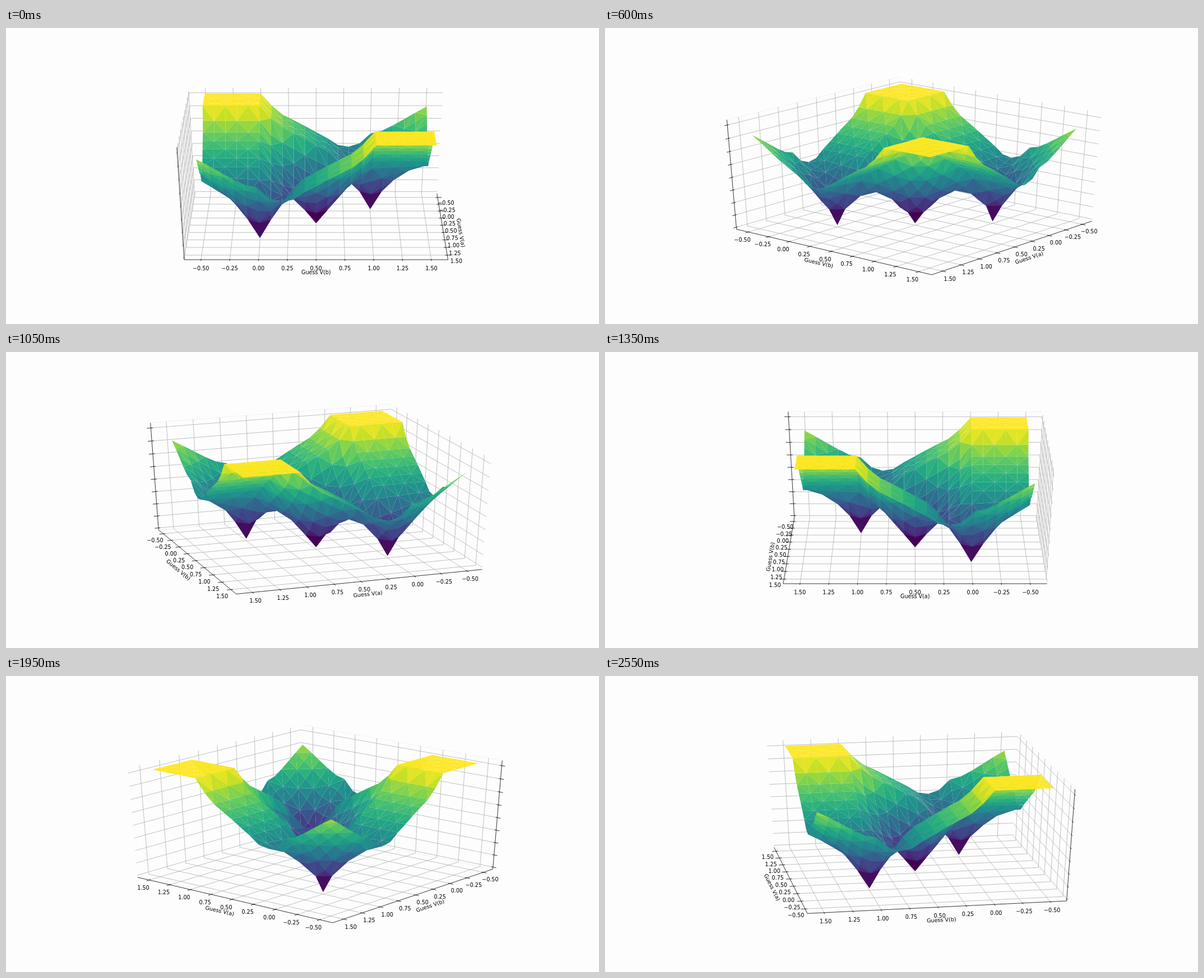
These frames come from a looping animation (1058 by 529 pixels, 2700 ms). An HTML page:

```html
<!DOCTYPE html>
<html lang="en">
<head>
<meta charset="utf-8">
<title>Rotating surface plot</title>
<style>
  html, body { margin: 0; width: 100%; height: 100%; overflow: hidden; background: #fdfdfd; }
  svg { display: block; width: 100%; height: 100%; }
  text { font: 9.6px "DejaVu Sans", sans-serif; text-anchor: middle; fill: #000; }
  .lines { fill: none; stroke-width: .8; }
</style>
</head>
<body>
<svg id="stage" viewBox="0 0 1058 529"></svg>
<script>
const STEP_MS = 150, STEPS = 18;
const HALF = 25 / 48;          // half size of the wall box, the data box being 1
const TICK = 1 / 12;
const LABEL_GAP = HALF + 0.037, TITLE_GAP = HALF + 0.0775;
const ELEV = Math.PI / 6;
const VIRIDIS = ['440154', '482475', '414487', '355f8d', '2a788e', '21918c',
  '22a884', '44bf70', '7ad151', 'bddf26', 'fde725']
  .map(hex => [0, 2, 4].map(i => parseInt(hex.substr(i, 2), 16)));

// Heights between the diagonals: row = 10b, entry = 10a - 10b
const ROWS = [
  [1, .884, .798, .745, .69, .631, .575, .48, .33, .175, 0],
  [.75, .68, .62, .56, .505, .45, .38, .3, .222],
  [.58, .51, .435, .378, .338, .334, .31],
  [.4, .31, .252, .262, .29],
  [.2, .128, .165],
  [0]
];
const RIM = { 7: .507, 8: .49, 9: .523 };   // heights at b = -0.5

const slope = n => 1.703 * n / (n + 8.73);

// i = 10a, j = 10b; the surface mirrors in both diagonals
function height(i, j) {
  if (j > i) [i, j] = [j, i];
  if (i + j > 10) [i, j] = [10 - j, 10 - i];
  if (i <= 0) return 1;
  if (j >= 0) return ROWS[j][i - j];
  if (i >= 10) return Math.hypot(slope(i - 10), slope(-j));
  const h = ROWS[0][i];
  return i < 7 ? h : h + (RIM[i] - h) * -j / 5;
}

const unit = v => (v - 0.5) / 2.2;
const vertex = (i, j) => [unit(i / 10), unit(j / 10), height(i, j) - 0.5];

function buildTriangles() {
  const list = [];
  for (let i = -5; i < 15; i++) {
    for (let j = -5; j < 15; j++) {
      const p = vertex(i, j), q = vertex(i + 1, j), r = vertex(i + 1, j + 1), s = vertex(i, j + 1);
      if ((i + j) & 1) list.push([p, q, r], [p, r, s]);
      else list.push([p, q, s], [q, r, s]);
    }
  }
  const mean = t => (t[0][2] + t[1][2] + t[2][2]) / 3;
  const means = list.map(mean);
  const lo = Math.min(...means), hi = Math.max(...means);
  return list.map((pts, n) => ({ pts, fill: viridis((means[n] - lo) / (hi - lo)) }));
}

function viridis(t) {
  const n = Math.min(9, Math.floor(t * 10)), k = t * 10 - n;
  return `rgb(${VIRIDIS[n].map((c, i) => Math.round(c + (VIRIDIS[n + 1][i] - c) * k))})`;
}

const stage = document.getElementById('stage');
function add(tag, attrs = {}, content = '') {
  const el = document.createElementNS('http://www.w3.org/2000/svg', tag);
  for (const key in attrs) el.setAttribute(key, attrs[key]);
  el.textContent = content;
  return stage.appendChild(el);
}

const ticks = Array.from({ length: 9 }, (_, n) => -0.5 + n * 0.25);
const zTicks = ticks.map((_, n) => -0.5 + n * 0.1217);
const format = v => (v < 0 ? '\u2212' : '') + Math.abs(v).toFixed(2);

const wallEdge = add('path', { class: 'lines', stroke: '#e6e6e6', 'stroke-dasharray': '3 2' });
const grid = add('path', { class: 'lines', stroke: '#b0b0b0' });
const axes = add('path', { class: 'lines', stroke: '#000' });
const aLabels = ticks.map(v => add('text', {}, format(v)));
const bLabels = ticks.map(v => add('text', {}, format(v)));
const aTitle = add('text', {}, 'Guess V(a)');
const bTitle = add('text', {}, 'Guess V(b)');
const triangles = buildTriangles();
const faces = triangles.map(() => add('path'));

function camera(azim) {
  const ca = Math.cos(azim), sa = Math.sin(azim), ce = Math.cos(ELEV), se = Math.sin(ELEV);
  return ([x, y, z]) => {
    const near = x * ca + y * sa, side = y * ca - x * sa;
    const depth = 10 - near * ce - z * se;
    return [553.3 + 4432 * side / depth, 257.5 - 2159 * (z * ce - near * se) / depth, depth];
  };
}

function draw(step) {
  const project = camera(step * Math.PI / 18);
  const line = (...pts) => 'M' + pts.map(p => {
    const [x, y] = project(p);
    return x.toFixed(2) + ' ' + y.toFixed(2);
  }).join('L');

  const nearX = step <= 9 ? 1 : -1;
  const nx = nearX * HALF, fx = -nx, ny = HALF, fy = -HALF, top = HALF, floor = -HALF;
  const out = TICK * 0.2, inn = TICK * 0.1;

  wallEdge.setAttribute('d', line([fx, fy, top], [nx, fy, top]) + line([fx, fy, floor], [nx, fy, floor]));

  let g = '';
  let k = line([-HALF, ny, floor], [HALF, ny, floor])
    + line([nx, -HALF, floor], [nx, HALF, floor])
    + line([nx, fy, floor], [nx, fy, top]);
  for (const v of ticks.map(unit)) {
    g += line([v, fy, top], [v, fy, floor], [v, ny, floor]);
    g += line([fx, v, top], [fx, v, floor], [nx, v, floor]);
    k += line([v, ny + out, floor], [v, ny - inn, floor]);
    k += line([nx + nearX * out, v, floor], [nx - nearX * inn, v, floor]);
  }
  for (const z of zTicks) {
    g += line([fx, ny, z], [fx, fy, z], [nx, fy, z]);
    k += line([nx + nearX * out, fy, z], [nx - nearX * inn, fy, z]);
  }
  grid.setAttribute('d', g);
  axes.setAttribute('d', k);

  const place = (el, p) => {
    const [x, y] = project(p);
    el.setAttribute('x', x);
    el.setAttribute('y', y + 7.2);
  };
  ticks.forEach((v, n) => {
    place(aLabels[n], [unit(v), LABEL_GAP, -LABEL_GAP]);
    place(bLabels[n], [nearX * LABEL_GAP, unit(v), -LABEL_GAP]);
  });

  const title = (el, p, from, to) => {
    const [x, y] = project(p), [x1, y1] = project(from), [x2, y2] = project(to);
    const angle = Math.atan((y2 - y1) / (x2 - x1)) * 180 / Math.PI;
    el.setAttribute('transform', `translate(${x} ${y}) rotate(${angle}) translate(0 2.5)`);
  };
  title(aTitle, [0, TITLE_GAP, -TITLE_GAP], [-HALF, ny, floor], [HALF, ny, floor]);
  title(bTitle, [nearX * TITLE_GAP, 0, -TITLE_GAP], [nx, -HALF, floor], [nx, HALF, floor]);

  // Farthest triangles first
  triangles
    .map(t => ({ t, depth: t.pts.reduce((sum, p) => sum + project(p)[2], 0) }))
    .sort((m, n) => n.depth - m.depth)
    .forEach(({ t }, n) => {
      faces[n].setAttribute('d', line(...t.pts) + 'Z');
      faces[n].setAttribute('fill', t.fill);
    });
}

const start = performance.now();
let shown = 0;
draw(shown);
function tick() {
  const step = Math.floor((performance.now() - start) / STEP_MS) % STEPS;
  if (step !== shown) draw(shown = step);
  requestAnimationFrame(tick);
}
requestAnimationFrame(tick);
</script>
</body>
</html>
```
